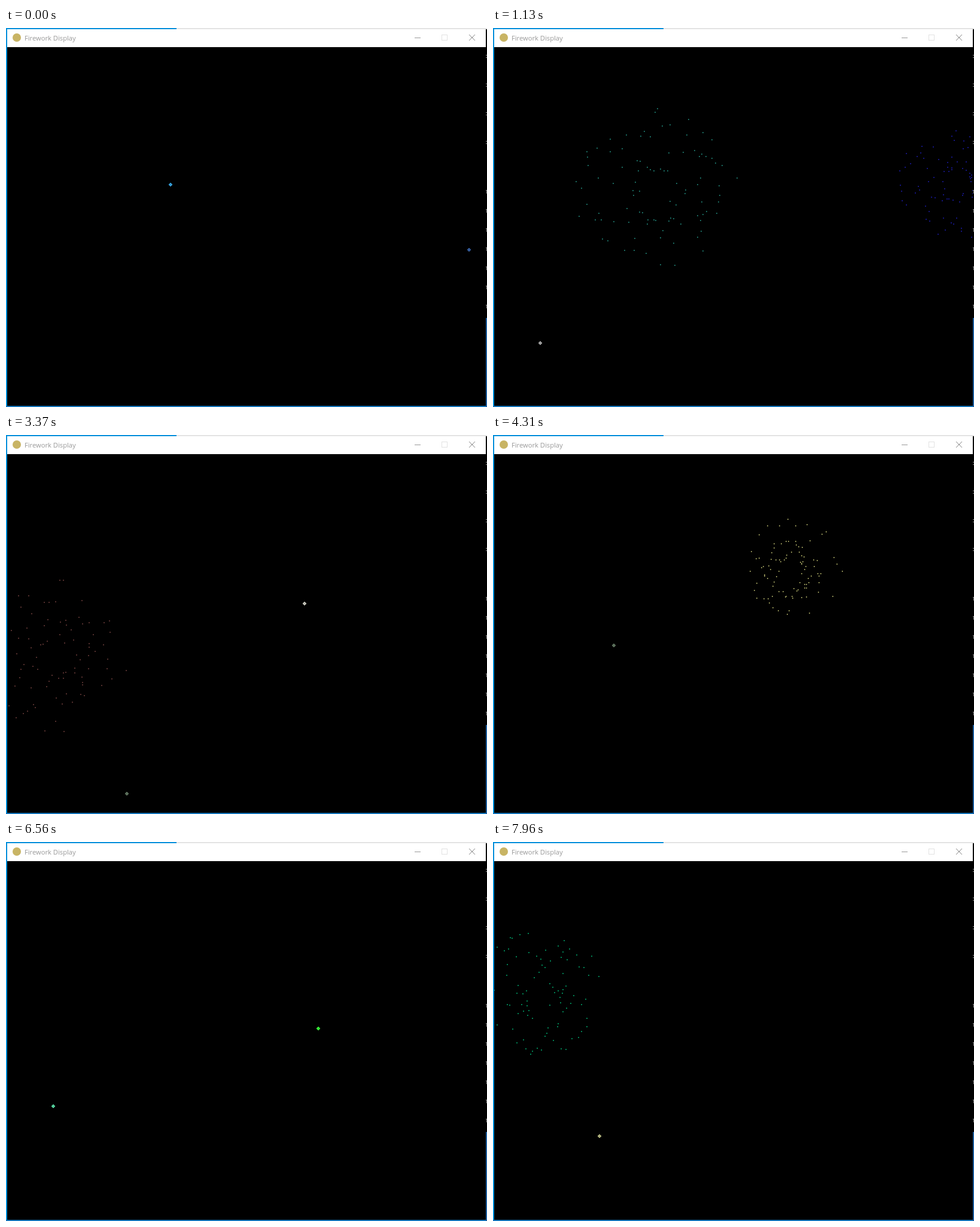
Recreate the animation shown at these times as an HTML page. Size 804x634 px, loop 7990 ms.

```html
<!DOCTYPE html>
<html lang="en">
<head>
<meta charset="utf-8">
<title>Firework Display</title>
<style>
  html, body { margin: 0; width: 100%; height: 100%; overflow: hidden; background: #000; }
  svg { display: block; width: 100vw; height: 100vh; }
  .title { font: 11.2px "Open Sans", "Noto Sans", sans-serif; fill: #999; }
</style>
</head>
<body>
<svg viewBox="0 0 804 634" shape-rendering="crispEdges">
  <defs>
    <clipPath id="client"><rect x="2" y="32" width="800" height="600"/></clipPath>
  </defs>
  <rect width="804" height="634"/>
  <rect width="804" height="2" fill="#e4e4e4"/>
  <rect width="285" height="2" fill="#0091dc"/>
  <rect y="2" width="2" height="632" fill="#0091dc"/>
  <rect y="632" width="804" height="2" fill="#1272b8"/>
  <rect x="802" y="485" width="2" height="149" fill="#1c5c9c"/>
  <path id="specks" stroke="#8c8c8c"/>
  <rect x="2" y="2" width="800" height="30" fill="#fff"/>
  <circle cx="18" cy="16" r="7" fill="#c8b464" shape-rendering="auto"/>
  <text class="title" x="31" y="21">Firework Display</text>
  <g fill="none" stroke="#999">
    <path d="M683 16.5h10"/>
    <rect x="728.5" y="11.5" width="9" height="9" stroke="#e2e2e2"/>
    <path d="M774 11l10 10M784 11l-10 10" stroke="#888" shape-rendering="auto"/>
  </g>
  <g id="sky" clip-path="url(#client)"></g>
</svg>
<script>
const LOOP = 7990, TICKS = 261;
const GROUND = 632, GRAVITY = 0.2;
const SPARKS = 95, SLOWEST = 1, FASTEST = 4.85, LIFE = 33, FADE = 60;

// Launch and burst are in ticks, climb in pixels per tick.
const fireworks = [
  { x: 275, climb: 10, launch: -37, burst: 8, rocket: "#3296cd", spark: "#32c8b4" },
  { x: 774, climb: 9, launch: -29, burst: 17, rocket: "#325896", spark: "#1e1ebe" },
  { x: 79, climb: 5, launch: 16, burst: 83, rocket: "#9b9b9b", spark: "#965550" },
  { x: 499, climb: 7, launch: 60, burst: 123, rocket: "#b9b9af", spark: "#b9b96e" },
  { x: 202, climb: 8, launch: 106, burst: 151, rocket: "#586c58", spark: "#2d5f50" },
  { x: 522, climb: 5, launch: 150, burst: 215, rocket: "#34de34", spark: "#28d728" },
  { x: 79, climb: 10, launch: 195, burst: 238, rocket: "#50c896", spark: "#00c882" },
  { x: 178, climb: 7, launch: 240, burst: 300, rocket: "#aaac78", spark: "#aaac78" }
];

const sky = document.getElementById("sky");
fireworks.forEach((f, i) => {
  f.sparks = makeSparks(71 + i * 977);
  f.node = document.createElementNS("http://www.w3.org/2000/svg", "path");
  sky.appendChild(f.node);
});

drawSpecks();

// Slivers of the window behind, along the right edge.
function drawSpecks() {
  let d = "";
  for (let y = 45.5; y < 200; y += 48) d += `M802 ${y}h2m-2 4h2`;
  for (let y = 271.5; y < 480; y += 32) d += `M802 ${y}h2m-1 0v5`;
  document.getElementById("specks").setAttribute("d", d);
}

function random(seed) {
  return () => {
    seed = (seed + 0x6D2B79F5) | 0;
    let n = Math.imul(seed ^ (seed >>> 15), 1 | seed);
    n ^= n + Math.imul(n ^ (n >>> 7), 61 | n);
    return ((n ^ (n >>> 14)) >>> 0) / 4294967296;
  };
}

function makeSparks(seed) {
  const rnd = random(seed);
  return Array.from({ length: SPARKS }, (_, i) => {
    const angle = (i + rnd()) / SPARKS * Math.PI * 2;
    const speed = SLOWEST + rnd() * (FASTEST - SLOWEST);
    return { vx: Math.cos(angle) * speed, vy: Math.sin(angle) * speed };
  });
}

// Pixel disc built from crossed bars.
function disc(x, y, r) {
  let d = "";
  for (let i = 1; i <= r; i++) {
    const j = r + 1 - i;
    d += `M${x - i} ${y - j}h${2 * i}v${2 * j}h${-2 * i}z`;
  }
  return d;
}

const height = (f, tick) => GROUND - f.climb * (tick - f.launch);

function burstPath(f, age) {
  const y = height(f, f.burst) + GRAVITY * age * (age + 1) / 2;
  const r = age < LIFE / 2 ? 2 : 1;
  return f.sparks.map(s =>
    disc(Math.round(f.x + s.vx * age), Math.round(y + s.vy * age), r)).join("");
}

function drawFirework(f, tick) {
  const age = tick - f.burst;
  const rising = tick > f.launch && age <= 0;
  const burning = age > 0 && age <= LIFE;
  f.node.setAttribute("d",
    rising ? disc(f.x, height(f, tick), 3) : burning ? burstPath(f, age) : "");
  f.node.setAttribute("fill", rising ? f.rocket : f.spark);
  f.node.setAttribute("opacity", burning ? 1 - age / FADE : 1);
}

function render(ms) {
  const tick = Math.min(Math.floor(ms % LOOP / LOOP * TICKS + 0.28), TICKS - 1);
  for (const f of fireworks) drawFirework(f, tick);
}

const start = performance.now();
function loop() {
  render(performance.now() - start);
  requestAnimationFrame(loop);
}
loop();
</script>
</body>
</html>
```
